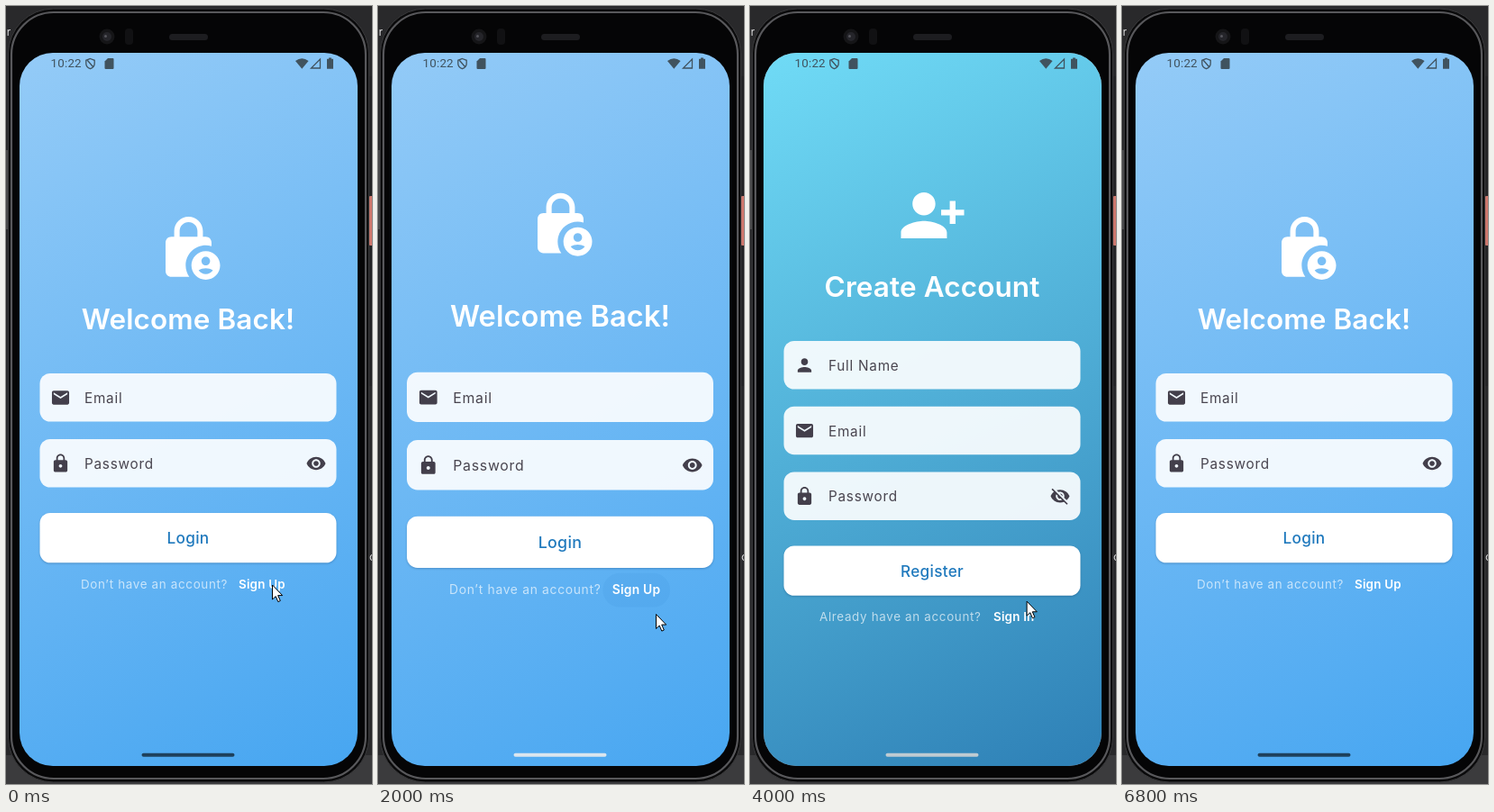
Write an HTML page that moves like this. It is 406 px wide and 864 px high and loops after 6.9 s.

```html
<!DOCTYPE html>
<html lang="en">
<head>
<meta charset="utf-8">
<title>Login and register</title>
<style>
  html, body { margin: 0; width: 100%; height: 100%; overflow: hidden; background: #29292b; }
  svg { display: block; width: 406px; height: 864px; font-family: Inter, "Open Sans", sans-serif; }
  .title { font-size: 31.5px; font-weight: 600; letter-spacing: .1px; fill: #fff; text-anchor: middle; }
  .label { font-size: 15.3px; letter-spacing: .75px; fill: #49454f; }
  .action { font-size: 17.2px; font-weight: 500; letter-spacing: .3px; fill: #1f79bd; text-anchor: middle; }
  .hint { font-size: 13.4px; letter-spacing: .67px; fill: #fff; fill-opacity: .66; }
  .link { font-size: 13.4px; font-weight: 600; letter-spacing: .2px; fill: #fff; }
  .clock { font: 13.4px Roboto, sans-serif; letter-spacing: .2px; }
  .button { fill: #fff; filter: drop-shadow(0 1.5px 1px rgba(0, 30, 70, .25)); }
</style>
</head>
<body>
<svg id="stage" viewBox="0 0 406 864"></svg>
<script>
const ICONS = {
  mail: 'M20 4H4c-1.1 0-1.99.9-1.99 2L2 18c0 1.1.9 2 2 2h16c1.1 0 2-.9 2-2V6c0-1.1-.9-2-2-2zm0 4l-8 5-8-5V6l8 5 8-5v2z',
  lock: 'M18 8h-1V6c0-2.76-2.24-5-5-5S7 3.24 7 6v2H6c-1.1 0-2 .9-2 2v10c0 1.1.9 2 2 2h12c1.1 0 2-.9 2-2V10c0-1.1-.9-2-2-2zm-6 9c-1.1 0-2-.9-2-2s.9-2 2-2 2 .9 2 2-.9 2-2 2zm3.1-9H8.9V6c0-1.71 1.39-3.1 3.1-3.1 1.71 0 3.1 1.39 3.1 3.1v2z',
  person: 'M12 12c2.21 0 4-1.79 4-4s-1.79-4-4-4-4 1.79-4 4 1.79 4 4 4zm0 2c-2.67 0-8 1.34-8 4v2h16v-2c0-2.66-5.33-4-8-4z',
  eye: 'M12 4.5C7 4.5 2.73 7.61 1 12c1.73 4.39 6 7.5 11 7.5s9.27-3.11 11-7.5c-1.73-4.39-6-7.5-11-7.5zM12 17c-2.76 0-5-2.24-5-5s2.24-5 5-5 5 2.24 5 5-2.24 5-5 5zm0-8c-1.66 0-3 1.34-3 3s1.34 3 3 3 3-1.34 3-3-1.34-3-3-3z',
  eyeOff: 'M12 7c2.76 0 5 2.24 5 5 0 .65-.13 1.26-.36 1.83l2.92 2.92c1.51-1.26 2.7-2.89 3.43-4.75-1.73-4.39-6-7.5-11-7.5-1.4 0-2.74.25-3.98.7l2.16 2.16C10.74 7.13 11.35 7 12 7zM2 4.27l2.28 2.28.46.46C3.08 8.3 1.78 10.02 1 12c1.73 4.39 6 7.5 11 7.5 1.55 0 3.03-.3 4.38-.84l.42.42L19.73 22 21 20.73 3.27 3 2 4.27zM7.53 9.8l1.55 1.55c-.05.21-.08.43-.08.65 0 1.66 1.34 3 3 3 .22 0 .44-.03.65-.08l1.55 1.55c-.67.33-1.41.53-2.2.53-2.76 0-5-2.24-5-5 0-.79.2-1.53.53-2.2zm4.31-.78l3.15 3.15.02-.16c0-1.66-1.34-3-3-3l-.17.01z',
  lockPerson: 'M18 11c.7 0 1.37.1 2 .29V10c0-1.1-.9-2-2-2h-1V6c0-2.76-2.24-5-5-5S7 3.24 7 6v2H6c-1.1 0-2 .9-2 2v10c0 1.1.9 2 2 2h6.26C11.47 20.87 11 19.49 11 18c0-3.87 3.13-7 7-7zM8.9 6c0-1.71 1.39-3.1 3.1-3.1s3.1 1.39 3.1 3.1v2H8.9V6zM18 13c-2.76 0-5 2.24-5 5s2.24 5 5 5 5-2.24 5-5-2.24-5-5-5zm0 2c.83 0 1.5.67 1.5 1.5S18.83 18 18 18s-1.5-.67-1.5-1.5S17.17 15 18 15zm0 6c-1.03 0-1.94-.52-2.48-1.32C16.25 19.26 17.09 19 18 19s1.75.26 2.48.68C19.94 20.48 19.03 21 18 21z',
  personAdd: 'M13 8c0-2.21-1.79-4-4-4S5 5.79 5 8s1.79 4 4 4 4-1.79 4-4zm2 2v2h3v3h2v-3h3v-2h-3V7h-2v3h-3zM1 18v2h16v-2c0-2.66-5.33-4-8-4s-8 1.34-8 4z'
};
const LOOP = 6900, STEP = 100, PAGE_TIME = 300;
const MID_X = 202.5, MID_Y = 448;
const HERO_Y = [269, 232.5];
const STATUS = '#40535f';

const icon = (name, x, y, size = 22.9, fill = '#433f4b') =>
  `<path fill="${fill}" fill-rule="evenodd" d="${ICONS[name]}" transform="translate(${x - size / 2} ${y - size / 2}) scale(${size / 24})"/>`;
const rect = (x, y, w, h, r, attrs) =>
  `<rect x="${x}" y="${y}" width="${w}" height="${h}" rx="${r}" ${attrs}/>`;
const text = (kind, x, y, words) => `<text class="${kind}" x="${x}" y="${y}">${words}</text>`;
const screen = attrs => rect(15, 52, 375, 792, 0, attrs);
const field = (y, name, words) => rect(37.5, y, 329, 53.5, 11.5, 'fill="#fff" fill-opacity=".9"')
  + icon(name, 60.5, y + 27) + text('label', 87, y + 33, words);
const button = (y, words) => rect(37.5, y, 329, 55.3, 11.5, 'class="button"') + text('action', 202, y + 34, words);
// The gradient line runs from corner to corner of the screen.
const gradient = (id, from, to) =>
  `<linearGradient id="${id}" gradientUnits="userSpaceOnUse" x1="15" y1="52" x2="390" y2="844">
    <stop stop-color="${from}"/><stop offset="1" stop-color="${to}"/></linearGradient>`;
const ripple = (id, x, y) => `<g id="${id}" fill="none" stroke="#fff" stroke-opacity=".32" stroke-dasharray="1 2.2">`
  + [5, 9, 13, 17].map(r => `<circle cx="${x}" cy="${y}" r="${r}"/>`).join('') + '</g>';

const login = screen('fill="url(#sky)"')
  + text('title', 202, 359, 'Welcome Back!')
  + field(408, 'mail', 'Email') + field(481, 'lock', 'Password') + icon('eye', 344, 508)
  + button(563, 'Login')
  + rect(248, 624, 72, 36.5, 18, 'id="pressed" fill="#2a7fcc"')
  + ripple('ripple0', 298, 643)
  + text('hint', 83, 646.5, 'Don’t have an account?') + text('link', 258, 646.5, 'Sign Up');

const register = screen('fill="url(#sea)"')
  + text('title', 202, 323, 'Create Account')
  + field(372, 'person', 'Full Name') + field(444.7, 'mail', 'Email') + field(517.4, 'lock', 'Password')
  + icon('eyeOff', 344, 544.3)
  + button(599.5, 'Register')
  + ripple('ripple1', 309, 679)
  + text('hint', 77, 683, 'Already have an account?') + text('link', 270, 683, 'Sign In');

const backdrop = rect(0, 0, 406, 864, 0, 'fill="#29292b"')
  + rect(0, 160, 2, 88, 0, 'fill="#4a4a4c"') + rect(0, 832, 406, 32, 0, 'fill="#3b3b3d"')
  + rect(402, 78, 4, 344, 0, 'fill="#242426"') + rect(403, 211, 4, 55, 1, 'fill="#cc776d"')
  + '<g font-size="12" fill="#ddd"><text x="-6" y="33">ar</text><text x="403" y="616">c</text></g>';

const body = rect(2.5, 3, 400, 859, 50, 'fill="#0a0a0b" stroke="#3a3a3c"')
  + rect(6, 7, 393, 851, 47, 'fill="#050506" stroke="#58585b" stroke-width="2.2"')
  + '<circle cx="112" cy="34" r="8.5" fill="#151517"/><circle cx="112" cy="34" r="5" fill="#25252a"/><circle cx="110.5" cy="33.5" r="1.5" fill="#55555c"/>'
  + rect(132, 25, 9, 18, 4, 'fill="#111113"') + rect(181, 31, 43, 7, 3.5, 'fill="#1d1d20"');

const status = `<g fill="${STATUS}">` + text('clock', 49.5, 68, '10:22')
  + `<g fill="none" stroke="${STATUS}" stroke-width="1.3">
    <path d="M93.5 58.500l4.700 1.800v3.700q0 3.800-4.700 5.700-4.700-1.900-4.700-5.700v-3.700zM90.500 60.500l6 7"/>
    <path d="M338.500 69h10v-10z"/></g>
    <path d="M113 58h5.500q1 0 1 1v10q0 1-1 1h-8q-1 0-1-1v-7.500z"/>
    <path d="M321 61q7.300-5.400 14.600 0l-7.300 8.800z"/>
    <path d="M358 57.500h3v1.300h2v11h-7v-11h2z"/></g>`;

const stage = document.getElementById('stage');
stage.innerHTML = `<defs>${gradient('sky', '#94cbf7', '#47a6f1')}${gradient('sea', '#70dbf6', '#2e80b6')}
  <clipPath id="glass">${rect(15, 52, 375, 792, 37, '')}</clipPath></defs>
  ${backdrop}${body}
  <g clip-path="url(#glass)">
    <g id="login">${login}</g>
    ${screen('id="scrim" fill="#fef7ff"')}
    <g id="register">${register}</g>
    <g id="hero0">${icon('lockPerson', MID_X, 0, 76.4, '#fff')}</g>
    <g id="hero1">${icon('personAdd', MID_X, 0, 76.4, '#fff')}</g>
    ${status}${rect(150.5, 829.8, 103, 4, 2, 'id="nav"')}
  </g>
  <path id="cursor" d="M0 0V16L3.7 12.6 6.3 18.6 8.8 17.5 6.2 11.6H11.2Z" fill="#fff" stroke="#000" stroke-linejoin="round"/>`;

const part = Object.fromEntries([...stage.querySelectorAll('[id]')].map(el => [el.id, el]));
const clamp = v => Math.min(1, Math.max(0, v));
const span = (v, a, b) => clamp((v - a) / (b - a));
const lerp = (a, b, k) => a + (b - a) * k;

const cubic = (x1, y1, x2, y2) => x => {
  const at = (a, b, s) => 3 * a * s * (1 - s) ** 2 + 3 * b * s * s * (1 - s) + s ** 3;
  let lo = 0, hi = 1;
  for (let i = 0; i < 24; i++) {
    const s = (lo + hi) / 2;
    if (at(x1, x2, s) < x) lo = s; else hi = s;
  }
  return at(y1, y2, lo);
};
const glide = cubic(.4, 0, .2, 1);
const zoomIn = cubic(.05, 0, .133333, .06), zoomOut = cubic(.208333, .82, .25, 1);
const zoom = t => t < 1 / 6 ? .4 * zoomIn(t * 6) : .4 + .6 * zoomOut((t - 1 / 6) * 1.2);

// Start time and destination page: 0 login, 1 register.
const MOVES = [[4905 - LOOP, 0], [160, 1], [1920, 0], [3380, 1], [4905, 0]];
const POINTER = [[0, 295.5, 643], [700, 295.5, 643], [1500, 308.5, 675.5], [2200, 308.5, 675.5],
  [2900, 301.5, 641], [3700, 301.5, 641], [4500, 311.5, 677], [LOOP, 311.5, 677]];
const POINTER_GONE = 6000;

function pose(el, scale, opacity) {
  el.setAttribute('transform', `translate(${MID_X} ${MID_Y}) scale(${scale}) translate(${-MID_X} ${-MID_Y})`);
  el.setAttribute('opacity', opacity);
}

function draw(t) {
  const [start, to] = MOVES.filter(m => m[0] <= t).pop();
  const age = t - start, p = clamp(age / PAGE_TIME), z = zoom(p);
  if (to) {
    pose(part.login, lerp(1, 1.05, z), p < 1 ? 1 : 0);
    pose(part.register, lerp(.85, 1, z), span(p, .125, .25));
  } else {
    pose(part.login, lerp(1.1, 1, z), 1);
    pose(part.register, lerp(1, .9, z), 1 - span(p, .0825, .2075));
  }
  part.scrim.setAttribute('opacity', to ? .6 * span(p, .2075, .4175) : 0);
  part.pressed.setAttribute('opacity', to ? 0 : .1 * (1 - span(age, 200, 600)));

  const heroY = lerp(HERO_Y[1 - to], HERO_Y[to], glide(p));
  [0, 1].forEach(i => {
    part['hero' + i].setAttribute('transform', `translate(0 ${heroY})`);
    part['hero' + i].setAttribute('opacity', i === to ? 1 : 0);
    const tapped = MOVES.some(m => m[1] !== i && m[0] > t && m[0] - t <= 100);
    part['ripple' + i].setAttribute('opacity', tapped ? 1 : 0);
  });

  const light = to ? span(age, 200, 700) : 1 - span(age, 50, 500);
  const tone = Math.round(255 * light);
  part.nav.setAttribute('fill', `rgba(${tone},${tone},${tone},${lerp(.62, .9, light)})`);

  const next = POINTER.findIndex(k => k[0] > t);
  const [a, b] = [POINTER[next - 1], POINTER[next]], k = glide(span(t, a[0], b[0]));
  part.cursor.setAttribute('transform', `translate(${lerp(a[1], b[1], k)} ${lerp(a[2], b[2], k)})`);
  part.cursor.setAttribute('opacity', t < POINTER_GONE ? 1 : 0);
}

const begin = performance.now();
function tick() {
  const t = (performance.now() - begin) % LOOP;
  draw(Math.floor(t / STEP) * STEP);
  requestAnimationFrame(tick);
}
tick();
</script>
</body>
</html>
```
